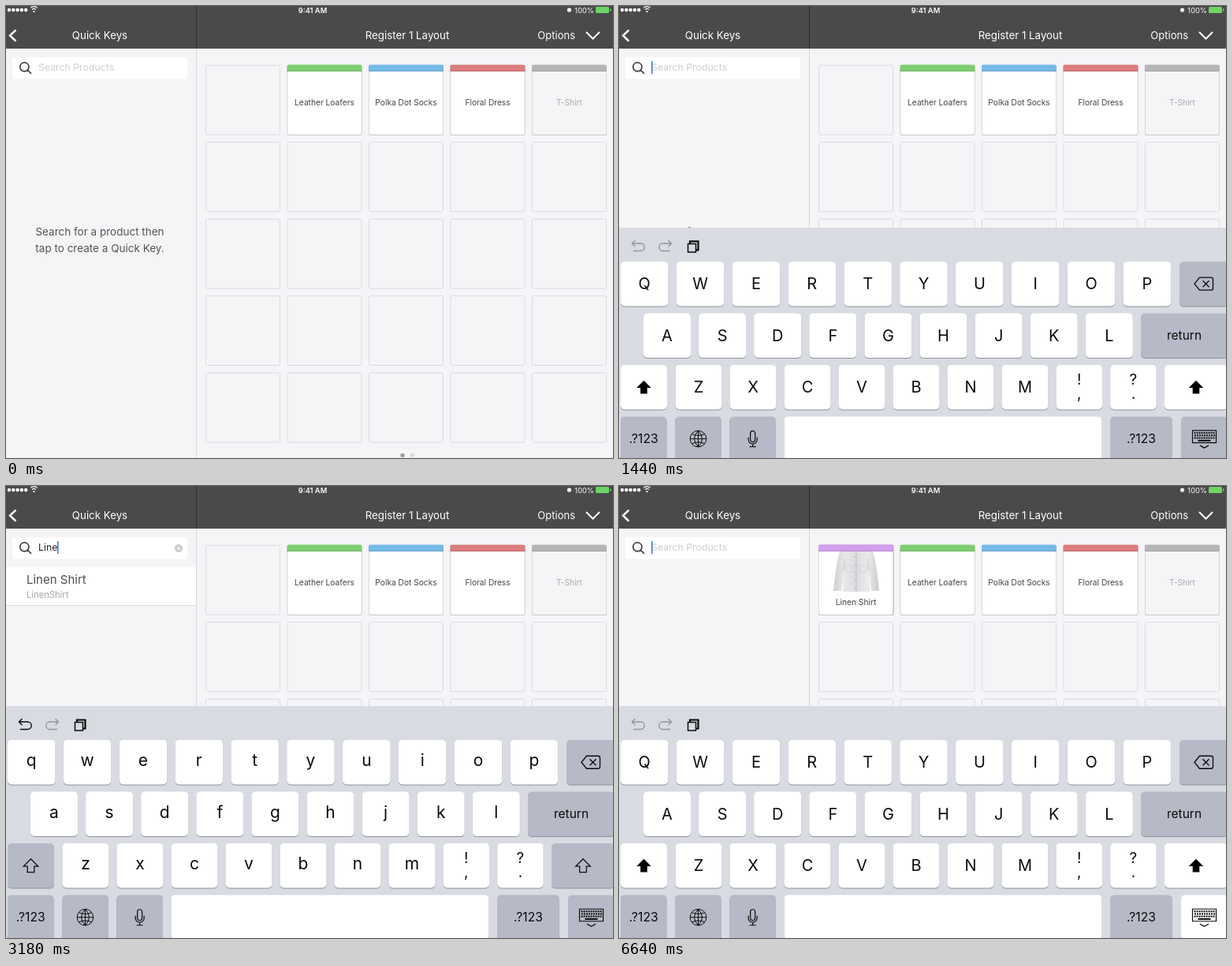
These frames come from a looping animation (770 px wide and 573 px high, 6.8 s). An HTML page with a canvas:

```html
<!DOCTYPE html>
<html lang="en">
<head>
<meta charset="utf-8">
<title>Quick Keys</title>
<style>
html, body { margin: 0; width: 100%; height: 100%; overflow: hidden; background: #f5f4f7; }
canvas { display: block; width: 770px; height: 573px; }
</style>
</head>
<body>
<canvas id="stage" width="770" height="573"></canvas>
<script>
const ctx = document.getElementById('stage').getContext('2d');
const LOOP = 6800;
const DARK = '#4c494b', PAGE = '#f5f4f7', GREY_KEY = '#b6bac6', INK = '#0b0b0c';
const KEYBOARD_TOP = 279, KEY_H = 56.5, ROW_PITCH = 65.5;
const CLEARED = 4970, TILE_READY = 5860;

// Each press: key, touch down, character inserted, touch up
const PRESSES = [
  ['L', 2050, 2140, 2200],
  ['i', 2290, 2360, 2430],
  ['n', 2790, 2850, 2905],
  ['e', 3060, 3120, 3175],
  ['n', 3420, 3490, 3565],
  ['dismiss', 6580, Infinity, 6800]
];
// Caret opacity keys: time, value
const CARET = [[1109, 0], [1110, 1], [1690, 1], [1800, 0], [2049, 0], [2050, 1],
  [3980, 1], [4140, 0], [4540, 0], [4640, 1], [5890, 1], [6040, 0], [6390, 0], [6500, 1]];

const ramp = (t, a, b) => Math.min(1, Math.max(0, (t - a) / (b - a)));

function track(keys, t) {
  let value = keys[0][1];
  for (let i = 1; i < keys.length; i++) {
    const [t0, v0] = keys[i - 1], [t1, v1] = keys[i];
    if (t >= t0) value = v0 + (v1 - v0) * ramp(t, t0, t1);
  }
  return value;
}

function text(str, x, y, size, color, align = 'left', weight = 400) {
  ctx.font = `${weight} ${size}px Inter, "Open Sans", sans-serif`;
  ctx.textAlign = align;
  ctx.fillStyle = color;
  ctx.fillText(str, x, y);
}

function rect(x, y, w, h, color) {
  ctx.fillStyle = color;
  ctx.fillRect(x, y, w, h);
}

function round(x, y, w, h, r, color) {
  ctx.beginPath();
  ctx.roundRect(x, y, w, h, r);
  ctx.fillStyle = color;
  ctx.fill();
}

function disc(x, y, r, color) {
  ctx.beginPath();
  ctx.arc(x, y, r, 0, Math.PI * 2);
  ctx.fillStyle = color;
  ctx.fill();
}

function path(d, color, width, x = 0, y = 0) {
  ctx.save();
  ctx.translate(x, y);
  const shape = new Path2D(d);
  if (width) {
    ctx.strokeStyle = color;
    ctx.lineWidth = width;
    ctx.stroke(shape);
  } else {
    ctx.fillStyle = color;
    ctx.fill(shape);
  }
  ctx.restore();
}

function header() {
  rect(0, 0, 770, 54, DARK);
  rect(241, 0, 1, 54, '#2f2d2e');
  for (let i = 0; i < 5; i++) disc(4 + i * 5.3, 5, 2.2, '#fff');
  path('M-4.3 -1.6 A6.2 6.2 0 0 1 4.3 -1.6 M-2.5 .6 A3.6 3.6 0 0 1 2.5 .6', '#fff', 1.3, 35.5, 4);
  disc(35.5, 7.2, 1.1, '#fff');
  text('9:41 AM', 389, 8.5, 9.3, '#fff', 'center', 600);
  disc(714.5, 5, 2.6, '#fff');
  text('100%', 746, 8.5, 9.3, '#fff', 'right');
  round(748, 1, 17, 8, 1.5, '#6bd565');
  rect(766, 3.5, 1.5, 3, '#6bd565');
  path('M12.5 30.5 L5 37.5 L12.5 44.5', '#fff', 2.4);
  text('Quick Keys', 119, 42, 13.3, '#fff', 'center');
  text('Register 1 Layout', 509, 42, 13.3, '#fff', 'center');
  text('Options', 722, 42, 13, '#fff', 'right');
  path('M736 33 L744.5 41.5 L753 33', '#fff', 2);
}

function sidebar(t, typed) {
  rect(241, 54, 1, 519, '#d9d8db');
  round(8, 65, 222, 27.5, 2, '#fff');
  path('M29 77.2 A5.6 5.6 0 1 1 17.8 77.2 A5.6 5.6 0 1 1 29 77.2 M27.4 81.2 L32 85.8', '#47454a', 1.7);
  text(typed || 'Search Products', 41, typed ? 82 : 82.3, 12.3, typed ? '#222' : '#d0cfd2');
  const caretX = typed ? 41 + ctx.measureText(typed).width : 41;
  ctx.globalAlpha = track(CARET, t);
  rect(Math.round(caretX), 70, 1.6, 16, '#3f7fd0');
  ctx.globalAlpha = 1;
  text('Search for a product then', 119, 290.5, 13.5, '#565457', 'center');
  text('tap to create a Quick Key.', 119, 311.5, 13.5, '#565457', 'center');
  if (!typed) return;
  disc(219, 79, 5, '#c8c7ca');
  path('M-1.9 -1.9 L1.9 1.9 M1.9 -1.9 L-1.9 1.9', '#fff', 1.1, 219, 79);
  rect(0, 102.5, 241, 49, t > 4790 ? '#dedde0' : '#fff');
  rect(0, 151, 241, 1, '#dcdbde');
  text('Linen Shirt', 26, 124, 15, '#4f4d50');
  text('LinenShirt', 26, 142, 11.2, '#a7a6a9');
}

function slot(x, y) {
  ctx.beginPath();
  ctx.roundRect(x + .5, y + .5, 94, 88, 2);
  ctx.strokeStyle = '#dddbdf';
  ctx.lineWidth = 1;
  ctx.stroke();
}

function productTile(x, name, bar, fill = '#fff', ink = '#444246', nameY = 125.5) {
  round(x, 75, 95, 89, 2, '#cbcacd');
  round(x + .7, 75, 93.6, 88, 2, fill);
  round(x, 74.5, 95, 8.5, [2, 2, 0, 0], bar);
  rect(x, 82, 95, 1, 'rgba(0,0,0,.12)');
  text(name, x + 47.5, nameY, 10.2, ink, 'center');
}

function shirt() {
  const shade = ctx.createLinearGradient(272, 0, 330, 0);
  [['0', '#cfced1'], ['.25', '#e8e7e9'], ['.5', '#dcdbde'], ['.75', '#ebeaec'], ['1', '#cccbce']]
    .forEach(([at, c]) => ctx.addColorStop ? 0 : shade.addColorStop(+at, c));
  path('M280 83 H322 Q327 100 330 133 H320 L317 107 L318 134 H284 L285 107 L282 133 H272 Q275 100 280 83 Z', shade);
  path('M285 107 L287 92 M317 107 L315 92 M301 84 V134', '#bdbcc0', .8);
  path('M288 101 H297 V109 H288 Z M305 101 H314 V109 H305 Z', '#c9c8cb', .6);
  for (let y = 90; y < 134; y += 10) disc(300, y, .8, '#a9a8ac');
}

function spinner(t) {
  ctx.beginPath();
  const start = (t - 5240) / 800 * Math.PI * 2;
  ctx.arc(300.5, 119.5, 7.6, start, start + Math.PI * 1.5);
  ctx.strokeStyle = '#fff';
  ctx.lineWidth = 2;
  ctx.stroke();
}

function grid(t) {
  for (let row = 0; row < 5; row++)
    for (let col = 0; col < 5; col++) slot(253 + col * 103.5, 74.7 + row * 97.45);
  productTile(356.5, 'Leather Loafers', '#7dce70');
  productTile(460, 'Polka Dot Socks', '#74b9e8');
  productTile(563.5, 'Floral Dress', '#db7c7d');
  productTile(667, 'T-Shirt', '#b5b4b7', PAGE, '#aaa9ac');
  if (t >= CLEARED) {
    ctx.globalAlpha = ramp(t, CLEARED - 40, CLEARED + 100);
    round(253, 74.5, 95.5, 89.5, 2, '#a09fa0');
    spinner(t);
    ctx.globalAlpha = ramp(t, TILE_READY, TILE_READY + 130);
    if (ctx.globalAlpha > 0) {
      productTile(253, 'Linen Shirt', '#d29eee', '#fff', '#444246', 151);
      shirt();
    }
    ctx.globalAlpha = 1;
  }
  disc(503, 569.5, 2.6, '#98979b');
  disc(515.5, 569.5, 2.6, '#d9d8db');
}

function keyboard(t, top, typed) {
  const upper = !typed;
  const held = name => PRESSES.some(([key, down, , up]) =>
    key.toLowerCase() === name.toLowerCase() && t >= down && t < up);
  const rowY = row => top + 43 + row * ROW_PITCH;

  function key(x, row, w, color) {
    const y = rowY(row);
    round(x, y + 1, w, KEY_H, 5, '#8f929b');
    round(x, y, w, KEY_H, 5, color);
    return [x + w / 2, y + KEY_H / 2];
  }
  function letters(chars, row, x, pitch, w) {
    [...chars].forEach((char, i) => {
      const [cx, cy] = key(x + i * pitch, row, w, held(char) ? GREY_KEY : '#fff');
      if (upper) text(char, cx, cy + 7.2, 20, INK, 'center');
      else text(char.toLowerCase(), cx, cy + 5, 21, INK, 'center');
    });
  }
  function shift(x, w) {
    const [cx, cy] = key(x, 2, w, upper ? '#fff' : GREY_KEY);
    const arrow = 'M0 -8.5 L9.2 .8 H4.3 V8.3 H-4.3 V.8 H-9.2 Z';
    if (upper) path(arrow, '#000', 0, cx, cy);
    else path(arrow, '#111', 1.3, cx, cy);
  }

  rect(0, top, 770, 573, '#d9dbe2');

  const undo = 'M-3.5 -8 L-7.5 -4 L-3.5 0 M-7.5 -4 H3.5 A4.6 4.6 0 0 1 3.5 5.5 H-6';
  path(undo, upper ? '#94969d' : INK, 1.4, 24, top + 24);
  ctx.save();
  ctx.translate(59, top + 24);
  ctx.scale(-1, 1);
  path(undo, '#94969d', 1.4);
  ctx.restore();
  path('M-6.5 -3.5 H3.5 V7 H-6.5 Z', INK, 1.5, 94, top + 24);
  path('M-4 -4 V-6.5 H6.5 V4.5 H4', INK, 2.2, 94, top + 24);

  letters('QWERTYUIOP', 0, 2, 70.85, 60.5);
  const [dx, dy] = key(711, 0, 62, GREY_KEY);
  path('M-12 0 L-5.5 -8 H9 Q11.5 -8 11.5 -5.5 V5.5 Q11.5 8 9 8 H-5.5 Z M-1.5 -4 L6.5 4 M6.5 -4 L-1.5 4', INK, 1.3, dx, dy);

  letters('ASDFGHJKL', 1, 31, 70.1, 60);
  const [rx, ry] = key(662, 1, 110, GREY_KEY);
  text('return', rx, ry + 5, 15.5, INK, 'center');

  shift(2, 59);
  letters('ZXCVBNM', 2, 71.5, 69, 59);
  ['!,', '?.'].forEach((pair, i) => {
    const [cx, cy] = key(554.5 + i * 68.7, 2, 58.5, '#fff');
    text(pair[0], cx, cy - 3, 19, INK, 'center');
    text(pair[1], cx, cy + 15, 19, INK, 'center');
  });
  shift(692, 80);

  const [ax, ay] = key(2, 3, 58.5, GREY_KEY);
  text('.?123', ax, ay + 5.5, 15.7, INK, 'center');
  const [gx, gy] = key(71, 3, 59, GREY_KEY);
  path('M10.3 0 A10.3 10.3 0 1 1 -10.3 0 A10.3 10.3 0 1 1 10.3 0 M-10.3 0 H10.3 M0 -10.3 V10.3 '
    + 'M0 -10.3 Q-10 0 0 10.3 M0 -10.3 Q10 0 0 10.3 M-8 -6 Q0 -2.5 8 -6 M-8 6 Q0 2.5 8 6', INK, 1, gx, gy);
  const [mx, my] = key(140.3, 3, 58.7, GREY_KEY);
  path('M-3 -7 A3 3 0 0 1 3 -7 V1 A3 3 0 0 1 -3 1 Z M-5.5 -2 V1 A5.5 5.5 0 0 0 5.5 1 V-2 M0 6.5 V10 M-4 10 H4', INK, 1.2, mx, my);
  key(209.5, 3, 403, '#fff');
  const [bx, by] = key(623, 3, 79, GREY_KEY);
  text('.?123', bx, by + 5.5, 15.7, INK, 'center');
  const [kx, ky] = key(713, 3, 59, held('dismiss') ? '#fff' : GREY_KEY);
  path('M-15 -10.5 H15 V5 H-15 Z', INK, 1.2, kx, ky);
  for (let row = 0; row < 3; row++)
    for (let col = 0; col < 9; col++)
      rect(kx - 13 + col * 3 + (row % 2) * .5, ky - 8.5 + row * 3.2, 2, 2, INK);
  rect(kx - 8, ky + 1.2, 16, 2, INK);
  path('M-5.5 8.5 L0 11.5 L5.5 8.5', INK, 1.4, kx, ky);
}

function draw(t) {
  const typed = t < CLEARED
    ? PRESSES.filter(press => t >= press[2]).map(press => press[0]).join('') : '';
  rect(0, 0, 770, 573, PAGE);
  header();
  sidebar(t, typed);
  grid(t);
  if (t >= 1110) {
    const drop = (573 - KEYBOARD_TOP) * Math.exp(-(t - 1100) / 68);
    keyboard(t, KEYBOARD_TOP + (drop < .5 ? 0 : drop), typed);
  }
}

const begun = performance.now();
function frame() {
  draw((performance.now() - begun) % LOOP);
  requestAnimationFrame(frame);
}
frame();
</script>
</body>
</html>
```
